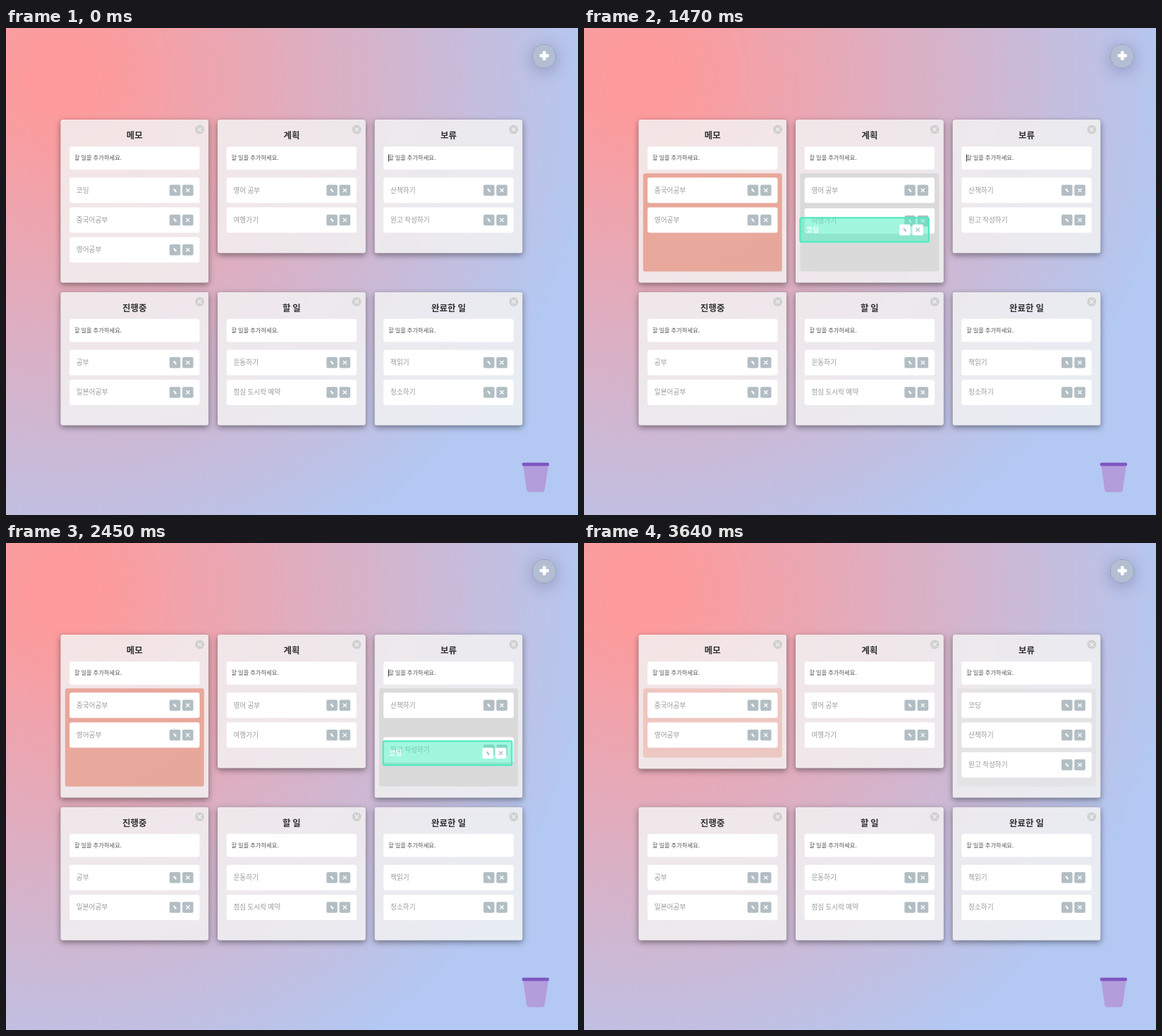
Recreate the animation shown at these times as an HTML page with a canvas. Size 811 by 691 pixels, loop 3710 ms.

```html
<!DOCTYPE html>
<html lang="ko">
<head>
<meta charset="utf-8">
<title>할 일 보드</title>
<style>
  html, body { margin: 0; width: 100%; height: 100%; overflow: hidden; background: #b3c8f2; }
  canvas { display: block; }
</style>
</head>
<body>
<canvas id="stage" width="811" height="691"></canvas>
<script>
const ctx = document.getElementById('stage').getContext('2d');
const LOOP = 3710, STEP = 70, DROP = 3150, PICK = 140;
const ROW = 42.2, GREY = '#b2bec3', WHITE = '#fff';

const ease = p => {
  p = Math.max(0, Math.min(1, p));
  return p * p * (3 - 2 * p);
};

// Follows steps of [start, value, duration] from a first value.
const track = (t, value, ...steps) => {
  for (const [start, to, length = 200] of steps) value += (to - value) * ease((t - start) / length);
  return value;
};

function roundBox(x, y, w, h, r, fill) {
  ctx.beginPath();
  ctx.roundRect(x, y, w, h, r);
  ctx.fillStyle = fill;
  ctx.fill();
}

function disc(x, y, r, fill) {
  ctx.beginPath();
  ctx.arc(x, y, r, 0, Math.PI * 2);
  ctx.fillStyle = fill;
  ctx.fill();
}

function label(text, x, y, size, color, weight = 400, align = 'left') {
  ctx.font = `${weight} ${size}px "Noto Sans CJK KR", "Noto Sans CJK", sans-serif`;
  ctx.textAlign = align;
  ctx.fillStyle = color;
  ctx.fillText(text, x, y + size * 0.37);
}

function line(x1, y1, x2, y2, width, color) {
  ctx.beginPath();
  ctx.moveTo(x1, y1);
  ctx.lineTo(x2, y2);
  ctx.lineWidth = width;
  ctx.strokeStyle = color;
  ctx.stroke();
}

function cross(x, y, r, width, color) {
  line(x - r, y - r, x + r, y + r, width, color);
  line(x - r, y + r, x + r, y - r, width, color);
}

// Casts a shadow only outside the shape, so a translucent fill stays clean.
function outerShadow(shape, color, blur, dy) {
  ctx.save();
  ctx.beginPath();
  ctx.rect(0, 0, 811, 691);
  shape();
  ctx.clip('evenodd');
  ctx.shadowColor = color;
  ctx.shadowBlur = blur;
  ctx.shadowOffsetY = dy;
  ctx.beginPath();
  shape();
  ctx.fillStyle = '#000';
  ctx.fill();
  ctx.restore();
}

function background() {
  const g = ctx.createRadialGradient(81, 69, 40, 81, 69, 760);
  g.addColorStop(0, '#ff9a9a');
  g.addColorStop(1, '#b3c8f2');
  ctx.fillStyle = g;
  ctx.fillRect(0, 0, 811, 691);
}

function itemButtons(x, y, fill, icon) {
  roundBox(x + 141.7, y + 10.3, 15.5, 15.5, 2, fill);
  roundBox(x + 160, y + 10.3, 15.5, 15.5, 2, fill);
  line(x + 147.7, y + 16, x + 151.2, y + 20.3, 2.2, icon);
  cross(x + 167.7, y + 18, 2.6, 1.3, icon);
}

function item(text, x, y) {
  roundBox(x, y, 184.4, 36, 3, WHITE);
  label(text, x + 9.7, y + 18, 9.7, '#999');
  itemButtons(x, y, GREY, WHITE);
}

function draggedItem(text, x, y) {
  roundBox(x, y, 184.4, 36, 3, 'rgba(85,239,196,.55)');
  ctx.beginPath();
  ctx.roundRect(x + 1, y + 1, 182.4, 34, 2);
  ctx.lineWidth = 2.2;
  ctx.strokeStyle = 'rgba(75,236,190,.9)';
  ctx.stroke();
  label(text, x + 9.5, y + 18, 9.7, WHITE, 700);
  itemButtons(x, y, WHITE, GREY);
}

function card({ title, x, y, rows = 2, items, tint, tintLevel = 0, caret }) {
  const height = 105 + rows * ROW;
  outerShadow(() => ctx.roundRect(x, y, 210, height, 3), 'rgba(0,0,0,.42)', 9, 3);
  roundBox(x, y, 210, height, 3, 'rgba(243,243,243,.83)');
  disc(x + 197.3, y + 14, 6.4, '#d0d0d0');
  cross(x + 197.3, y + 14, 2.7, 1.2, '#f6f6f6');
  label(title, x + 105, y + 22.7, 12.5, '#333', 700, 'center');
  roundBox(x + 12.8, y + 38.3, 184.4, 32.8, 3, WHITE);
  label('할 일을 추가하세요.', x + 19.7, y + 54.3, 8.3, '#555');
  if (caret) line(x + 20, y + 49.5, x + 20, y + 59.5, 1, '#333');

  if (tintLevel > 0) {
    ctx.globalAlpha = tintLevel;
    roundBox(x + 6.5, y + 76.3, 197, 12.7 + rows * ROW, 3, tint);
    ctx.globalAlpha = 1;
  }
  for (const [text, slot] of items) item(text, x + 12.8, y + 82.3 + slot * ROW);
}

function addButton() {
  outerShadow(() => {
    ctx.moveTo(779.5, 40);
    ctx.arc(763, 40, 16.5, 0, Math.PI * 2);
  }, 'rgba(60,70,120,.42)', 26, 4);
  disc(763, 40, 16.5, '#b3bed2');
  roundBox(756.7, 36.9, 13, 4.6, 1, WHITE);
  roundBox(760.9, 32.7, 4.6, 13, 1, WHITE);
}

function trashBin() {
  ctx.beginPath();
  ctx.moveTo(733.3, 621);
  ctx.lineTo(768.8, 621);
  ctx.lineTo(763.8, 655);
  ctx.quadraticCurveTo(763.2, 658.5, 760, 658.5);
  ctx.lineTo(742, 658.5);
  ctx.quadraticCurveTo(738.8, 658.5, 738.2, 655);
  ctx.closePath();
  ctx.fillStyle = '#b39ddb';
  ctx.fill();
  roundBox(731.7, 616.7, 38.3, 4.8, 2, '#7e57c2');
}

function draw(t) {
  const held = t >= PICK && t < DROP;
  const red = 'rgba(225,112,85,.52)', grey = 'rgba(218,218,218,.92)';
  const closeGap = from => track(t, from, [475, from - 1]);

  const memo = [['중국어공부', closeGap(1)], ['영어공부', closeGap(2)]];
  if (t < PICK) memo.unshift(['코딩', 0]);

  const plan = [
    ['영어 공부', track(t, 0, [490, 1], [760, 0], [1640, 1], [1900, 0])],
    ['여행가기', track(t, 1, [490, 2], [890, 1], [1450, 2], [1900, 1])]
  ];

  const hold = [
    ['산책하기', track(t, 0, [1900, 1, 150], [2070, 0], [2850, 1])],
    ['원고 작성하기', track(t, 1, [1900, 2], [2350, 1], [2678, 2])]
  ];
  if (t >= DROP) hold.unshift(['코딩', 0]);

  background();
  const columns = [77.3, 299.9, 522.5], top = 130, bottom = 374.4;
  card({ title: '메모', x: columns[0], y: top, items: memo,
    rows: track(t, 3, [3460, 2]),
    tint: red, tintLevel: track(t, 0, [490, 1, 400], [3470, 0, 340]) });
  card({ title: '계획', x: columns[1], y: top, items: plan,
    rows: track(t, 2, [505, 3], [1900, 2]),
    tint: grey, tintLevel: track(t, 0, [590, 1, 300], [1900, 0, 300]) });
  card({ title: '보류', x: columns[2], y: top, items: hold, caret: t < DROP,
    rows: track(t, 2, [1900, 3]),
    tint: grey, tintLevel: track(t, 0, [1900, 1, 300], [3470, 0, 340]) });
  card({ title: '진행중', x: columns[0], y: bottom, items: [['공부', 0], ['일본어공부', 1]] });
  card({ title: '할 일', x: columns[1], y: bottom, items: [['운동하기', 0], ['점심 도시락 예약', 1]] });
  card({ title: '완료한 일', x: columns[2], y: bottom, items: [['책읽기', 0], ['청소하기', 1]] });
  addButton();
  trashBin();

  if (held) {
    const x = track(t, 90, [PICK, 275.3, 490], [650, 305.5, 400], [1530, 533.8, 640]);
    const y = track(t, 212.3, [650, 295, 400], [1300, 212, 450], [1850, 251, 300],
      [2300, 296, 250], [2600, 212, 300]);
    draggedItem('코딩', x, y);
  }
}

const began = performance.now();
function frame() {
  const t = (performance.now() - began) % LOOP;
  draw(Math.floor(t / STEP) * STEP);
  requestAnimationFrame(frame);
}
frame();
</script>
</body>
</html>
```
